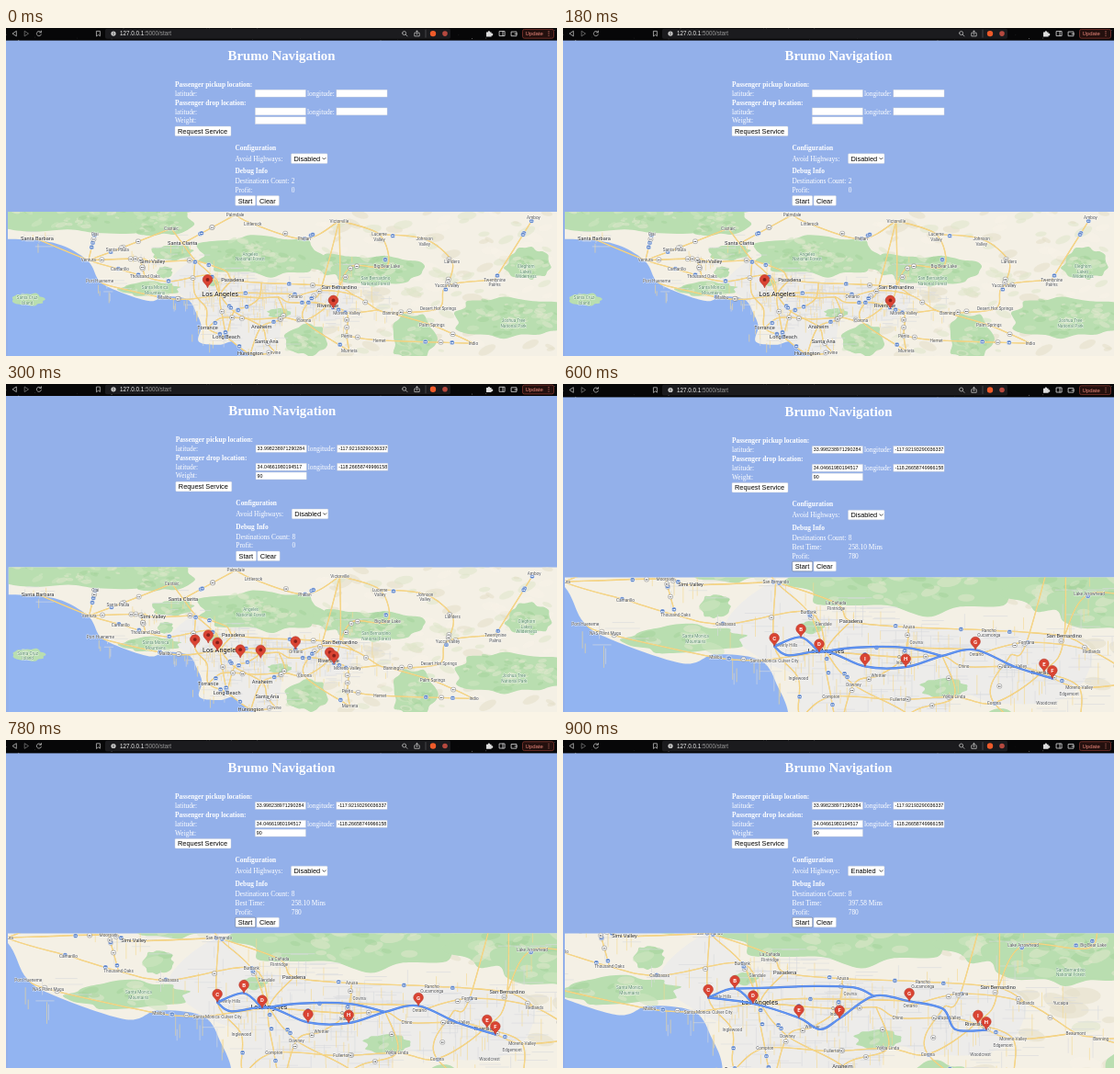
These frames come from a looping animation (600 by 357 pixels, 1200 ms). An HTML page:

```html
<!DOCTYPE html>
<html lang="en">
<head>
<meta charset="utf-8">
<title>Route planner</title>
<style>
html, body { margin: 0; width: 100%; height: 100%; overflow: hidden; background: #93b0ea; }
#stage { display: block; width: 100vw; height: 100vh; }
.scene { visibility: hidden; animation: show 1.2s step-end infinite; animation-delay: calc(var(--i) * .3s - 1.2s); }
@keyframes show { 0% { visibility: visible } 25%, 100% { visibility: hidden } }
.serif { font: 7.38px "Liberation Serif", Times, serif; fill: #fff; }
.bold { font-weight: bold; }
.title { font-size: 14.77px; text-anchor: middle; }
.ui { font: 7.38px "Liberation Sans", Arial, sans-serif; fill: #000; }
.value { font-size: 5.3px; }
.address { font-size: 6.3px; fill: #eee; }
.update { font-size: 6px; fill: #f08a7e; }
.place { font: 4.7px Roboto, Arial, sans-serif; fill: #4d4f52; text-anchor: middle;
  paint-order: stroke; stroke: #fff; stroke-opacity: .75; stroke-width: 1px; stroke-linejoin: round; }
.city { font-size: 5.7px; fill: #26282b; }
.metro { font-size: 7.3px; fill: #111; }
.park { fill: #4f8560; }
.letter { font: bold 6px Roboto, Arial, sans-serif; fill: #fff; text-anchor: middle; }
.line { fill: none; stroke-linecap: round; stroke-linejoin: round; }
</style>
</head>
<body>
<svg id="stage" viewBox="0 0 600 357" preserveAspectRatio="none"></svg>
<script>
// Geography: degrees west, degrees north.
const parse = s => Object.fromEntries(s.split(',').map(e => {
  const [, name, w, n] = e.trim().match(/^(.+) (\S+) (\S+)$/);
  return [name, [+w, +n]];
}));
const metro = parse('Los Angeles 118.24 34.05');
const cities = parse(`Santa Barbara 119.7 34.42, Santa Clarita 118.54 34.39, Simi Valley 118.78 34.27, Pasadena 118.14 34.15,
  San Bernardino 117.29 34.1, Riverside 117.38 33.98, Anaheim 117.91 33.84, Santa Ana 117.87 33.74, Long Beach 118.19 33.77,
  Torrance 118.34 33.83, Huntington 118 33.66`);
const towns = parse(`Ventura 119.29 34.28, Ojai 119.24 34.45, Santa Paula 119.06 34.35, Camarillo 119.04 34.22, Port Hueneme 119.2 34.14,
  Thousand Oaks 118.84 34.17, Malibu 118.68 34.03, Castaic 118.63 34.49, Palmdale 118.12 34.58, Littlerock 117.98 34.52,
  Phelan 117.57 34.42, Victorville 117.29 34.54, Lucerne/Valley 116.97 34.45, Johnson/Valley 116.61 34.42, Landers 116.39 34.27,
  Big Bear Lake 116.91 34.24, Yucca Valley 116.43 34.11, Twentynine/Palms 116.05 34.15, Amboy 115.74 34.56, Desert Hot Springs 116.5 33.96,
  Palm Springs 116.55 33.85, Indio 116.22 33.73, Banning 116.88 33.93, Hemet 116.97 33.75, Perris 117.23 33.78,
  Moreno Valley 117.23 33.93, Murrieta 117.21 33.68, Irvine 117.8 33.67, Corona 117.57 33.88, Ontario 117.64 34.04`);
const suburbs = parse(`Moorpark 118.88 34.29, NAS Point Mugu 119.12 34.11, San Fernando 118.44 34.28, Calabasas 118.64 34.14,
  Burbank 118.31 34.18, Glendale 118.25 34.14, La Cañada/Flintridge 118.2 34.21, Beverly Hills 118.4 34.07, Santa Monica 118.49 34.02,
  Culver City 118.39 34.02, Inglewood 118.35 33.96, Compton 118.22 33.9, Downey 118.13 33.94, Whittier 118.03 33.97,
  City of/Industry 117.93 34.03, Azusa 117.91 34.13, Covina 117.88 34.08, Fullerton 117.95 33.89, Yorba Linda 117.73 33.9,
  Chino 117.69 34, Rancho/Cucamonga 117.59 34.12, Fontana 117.44 34.08, Jurupa Valley 117.49 34, Redlands 117.18 34.05,
  Yucaipa 117.04 34.05, Beaumont 116.98 33.95, Lake Arrowhead 117.19 34.24, Edgemont 117.27 33.91, Woodcrest 117.36 33.88`);
const stops = parse(`Westwood 118.446 34.067, Hollywood 118.34 34.097, Downtown 118.267 34.047, Rivera 118.084 34,
  Rowland 117.922 33.998, Montclair 117.644 34.055, Canyon 117.37 33.982, Victoria 117.337 33.96`);
const junctions = parse(`Cheviot 118.39 34.037, Alhambra 118.117 34.063, West Covina 117.92 34.062, Pomona 117.776 34.035,
  Eagle Rock 118.2 34.1, San Gabriel 118.02 34.105, San Dimas 117.86 34.1, Claremont 117.787 34.072, La Habra 118 33.962,
  Mira Loma 117.51 34.03, Norco 117.46 33.962`);
const atlas = { ...metro, ...cities, ...towns, ...suburbs, ...stops, ...junctions };
const through = s => s.split('>').map(name => atlas[name]);

const highways = [
  'Santa Barbara>Ventura>Camarillo>Thousand Oaks>Calabasas>Burbank>Los Angeles',
  'Castaic>Santa Clarita>San Fernando>Burbank>Los Angeles>Downey>Anaheim>Santa Ana>Irvine',
  'Santa Monica>Los Angeles>Alhambra>West Covina>Montclair>Ontario>Fontana>Redlands>Beaumont>Banning>Palm Springs>Indio',
  'Victorville>Fontana>Mira Loma>Corona>Murrieta', 'Palmdale>Littlerock>Phelan>Victorville', 'Santa Clarita>Palmdale',
  'San Fernando>La Cañada/Flintridge>Pasadena>Azusa>Rancho/Cucamonga>San Bernardino>Redlands',
  'Los Angeles>City of/Industry>Pomona>Chino>Jurupa Valley>Riverside>Moreno Valley>Beaumont',
  'San Fernando>Westwood>Inglewood>Torrance>Long Beach>Huntington>Irvine',
  'Torrance>Compton>Fullerton>Yorba Linda>Corona>Riverside>San Bernardino>Victorville',
  'Azusa>City of/Industry>Whittier>Downey>Long Beach', 'Pomona>Yorba Linda>Anaheim>Huntington',
  'Ventura>Moorpark>Simi Valley>San Fernando', 'Ventura>Santa Paula>Castaic', 'Moorpark>Thousand Oaks', 'Ventura>Ojai',
  'Riverside>Moreno Valley>Perris>Murrieta', 'Banning>Desert Hot Springs>Yucca Valley>Twentynine/Palms',
  'San Bernardino>Lake Arrowhead>Big Bear Lake>Lucerne/Valley>Victorville', 'Lucerne/Valley>Johnson/Valley>Landers>Yucca Valley',
  'Perris>Hemet>Indio', 'Pasadena>Los Angeles>Compton>Long Beach', 'Port Hueneme>NAS Point Mugu>Malibu>Santa Monica',
  'Twentynine/Palms>Amboy'
].map(through);
const basin = through('San Fernando>Burbank>Pasadena>Azusa>Rancho/Cucamonga>San Bernardino>Redlands>Moreno Valley>Woodcrest>Corona>Yorba Linda>Irvine>Huntington>Long Beach>Torrance>Inglewood>Santa Monica>Calabasas');
const loop = 'Westwood>Hollywood>Downtown';
const routes = {
  direct: [loop, 'Westwood>Cheviot>Los Angeles>Rivera>Rowland>Pomona>Montclair>Jurupa Valley>Victoria', 'Downtown>Alhambra>West Covina>Pomona'],
  detour: [loop, 'Westwood>Downtown>Rivera>La Habra>Rowland>Claremont>Montclair>Mira Loma>Norco>Victoria',
    'Hollywood>Eagle Rock>San Gabriel>San Dimas>Claremont']
};
const coast = '120 34.42,119.69 34.41,119.48 34.37,119.29 34.27,119.21 34.15,119.1 34.09,118.81 34.01,118.68 34.04,118.5 34.02,118.43 33.93,118.39 33.84,118.41 33.74,118.25 33.72,118.1 33.74,117.93 33.61,117.7 33.46'
  .split(',').map(p => p.split(' ').map(Number));
// Parks: centre, then half width and height.
const parks = [
  [119.35, 34.61, .85, .15], [118.72, 34.56, .25, .12], [117.92, 34.31, .52, .13], [117.3, 34.25, .22, .07], [116.97, 34.21, .34, .1],
  [116.7, 33.76, .17, .16], [115.9, 33.9, .5, .13], [118.8, 34.09, .25, .045], [117.55, 33.75, .17, .1], [115.78, 34.26, .18, .1],
  [118.62, 34.33, .17, .05], [118.3, 34.13, .05, .02], [117.77, 33.93, .09, .03], [118.68, 34.2, .06, .04], [119.77, 34.02, .12, .04]
];
const parkNames = parse(`Angeles/National Forest 118 34.32, Santa Monica/Mountains 118.76 34.1, San Bernardino/National Forest 117 34.16,
  Joshua Tree/National Park 115.9 33.88, Cleghorn/Lakes/Wilderness 115.8 34.24, Santa Cruz/Island 119.78 34.03`);

const seeded = seed => () => (seed = (seed * 16807) % 2147483647) / 2147483647;
const many = (n, f) => Array.from({ length: n }, (_, i) => f(i)).join('');
const text = (x, y, cls, s) => `<text x="${x}" y="${y}" class="${cls}">${s}</text>`;
const rect = (x, y, w, h, attrs = 'fill="#fff"') => `<rect x="${x}" y="${y}" width="${w}" height="${h}" ${attrs}/>`;
const path = (d, fill) => `<path d="${d}" fill="${fill}"/>`;

// Smooth curve through points; closed when asked.
function curve(p, closed) {
  const n = p.length;
  const at = i => closed ? p[(i + n) % n] : p[Math.max(0, Math.min(n - 1, i))];
  let d = `M${p[0]}`;
  for (let i = 0; i < (closed ? n : n - 1); i++) {
    const [a, b, c, e] = [at(i - 1), at(i), at(i + 1), at(i + 2)];
    d += `C${b[0] + (c[0] - a[0]) / 6},${b[1] + (c[1] - a[1]) / 6} ${c[0] - (e[0] - b[0]) / 6},${c[1] - (e[1] - b[1]) / 6} ${c}`;
  }
  return d;
}
const line = (p, color, w) => `<path class="line" d="${curve(p)}" stroke="${color}" stroke-width="${w}"/>`;

// Flat map projection around downtown; x, y is where it lands on the stage.
const projection = (scale, x, y) => ([w, n]) => [x - scale * (w - 118.267), y + scale * 1.205 * (34.047 - n)];
const projections = { wide: projection(136.5, 229.5, 291), near: projection(273, 279, 292) };

function drawMap(id) {
  const project = projections[id], near = id === 'near', r = seeded(77);
  const zoom = near ? 2 : 1;
  const spread = n => (r() + r() - 1) * n;

  const patch = (w, n, size, color) => {
    const [x, y] = project([w, n]), s = size * (.4 + r());
    return `<ellipse cx="${x}" cy="${y}" rx="${s * 1.6}" ry="${s * .7}" fill="${color}" opacity=".55" transform="rotate(${r() * 60 - 30} ${x} ${y})"/>`;
  };
  const park = ([w, n, rw, rn]) => {
    const edge = Array.from({ length: 22 }, (_, i) => {
      const a = i / 22 * 2 * Math.PI, k = .85 + r() * .3;
      return project([w + rw * k * Math.cos(a), n + rn * k * Math.sin(a)]);
    });
    const tones = ['#a6d39d', '#cfe6c1', '#e0e8cd'];
    return path(curve(edge, true), '#b9deb0')
      + many(Math.min(70, rw * rn * 1200), i => patch(w + spread(rw * .9), n + spread(rn * .9), 3 * zoom, tones[i % 3]));
  };
  const desert = many(170, i => patch(115.6 + r() * 1.9, 33.55 + r() * 1.1, 5 * zoom, ['#e4dec8', '#f7f3e8', '#dfe6cb'][i % 3]));

  // Short streets crossing around every built-up place.
  const streets = Object.values({ ...metro, ...cities, ...suburbs, ...junctions }).map(p => many(9, i => {
    const [x, y] = project(p), a = x + spread(22 * zoom), b = y + spread(12 * zoom), l = (8 + r() * 12) * zoom;
    const d = i % 2 ? `h${l}` : `v${l * .6}`;
    return `<path d="M${a},${b}${d}" stroke="${i % 4 ? '#d9dadd' : '#f5d88f'}" stroke-width=".6"/>`;
  })).join('');

  const roads = highways.map(h => h.map(project));
  const shield = p => {
    const i = r() * (p.length - 1) | 0, t = r(), blue = r() < .55;
    const [x, y] = p[i].map((v, k) => v + (p[i + 1][k] - v) * t);
    return rect(x - 2.4, y - 2.3, 4.8, 4.6, `rx="1.6" fill="${blue ? '#5b83c9' : '#fff'}" stroke="${blue ? '#fff' : '#777'}" stroke-width=".5"`)
      + `<path d="M${x - 1.3},${y + .2}h2.6" stroke="${blue ? '#fff' : '#555'}" stroke-width="1.1" stroke-dasharray="1.1 .4"/>`;
  };
  const labels = (group, cls) => Object.entries(group).map(([name, p]) => {
    const [x, y] = project(p);
    return name.split('/').map((s, i) => text(x, y + 1.7 + i * 5.6, 'place ' + cls, s)).join('');
  }).join('');

  const shore = curve(coast.map(project));
  return `<g id="${id}">` + rect(-10, 150, 720, 250, 'fill="#92b4f1"')
    + path(shore + 'L900,600 900,-100 -300,-100Z', '#f4f0e5') + desert
    + path(curve(basin.map(project), true), '#edecea') + parks.map(park).join('') + streets
    + roads.map(p => line(p, '#eec568', 1.3) + line(p, '#fbe09a', .7)).join('')
    + roads.map(p => many(near ? 5 : 4, () => shield(p))).join('')
    + labels(towns, '') + (near ? labels(suburbs, '') : '') + labels(parkNames, 'park') + labels(cities, 'city') + labels(metro, 'metro')
    + '</g>';
}

function pin([x, y], letter) {
  return `<g transform="translate(${x} ${y - 8.5})"><path d="M0,8.5C-.8,4.5 -5.3,3.2 -5.3,-.4A5.3,5.3 0 1 1 5.3,-.4C5.3,3.2 .8,4.5 0,8.5Z" fill="#da4433" stroke="#b23427" stroke-width=".6"/>`
    + (letter ? text(0, 1.8, 'letter', letter) : '<circle r="1.9" cy="-.4" fill="#86201a"/>') + '</g>';
}

function toolbar(h) {
  const r = seeded(42);
  const icon = (d, color = '#bbb', w = .8) => `<path class="line" d="${d}" stroke="${color}" stroke-width="${w}"/>`;
  return rect(0, 0, 600, h, 'fill="#070708"')
    + many(60, () => `<circle cx="${r() * 600}" cy="${r() * h}" r="${.15 + r() * .35}" fill="#fff" opacity="${.3 + r() * .6}"/>`)
    + rect(108, .8, 376, h - 2.6, 'rx="2" fill="#1b1b1e"')
    + `<g transform="translate(0 ${h / 2 - .7})">`
    + icon('M11,-2.6L7,0 11,2.6Z') + icon('M20.5,-2.6L24.5,0 20.5,2.6Z', '#777')
    + icon('M38,-1.6A2.6,2.6 0 1 0 38.4,.9M38.4,-3v1.8h-1.8') + icon('M98.8,-2.7h3.6v5.4l-1.8,-1.4 -1.8,1.4z')
    + '<circle cx="117" r="2.6" fill="#ccc"/>' + icon('M117,-.2v1.3M117,-1.3v.1', '#222', .7)
    + text(124, 2.2, 'ui address', '127.0.0.1<tspan fill="#999">:5000/start</tspan>')
    + icon('M431.6,-.5a2,2 0 1 0 4,0a2,2 0 1 0 -4,0M435.2,1l1.8,1.8') + icon('M446,-.6h-1.2v3.4h5.4v-3.4h-1.2M447.5,1v-4M446,-1.7l1.5,-1.5 1.5,1.5')
    + icon('M457,-4v8', '#666', .6)
    + '<circle cx="465" r="3.2" fill="#ef5b2a"/><circle cx="478" r="2.8" fill="#b5493f"/>'
    + path('M523,-1.7h1.7a1.2,1.2 0 1 1 2.4,0h1.5v1.6a1.2,1.2 0 1 1 0,2.2v1.2h-5.6z', '#ddd')
    + icon('M537.5,-2.5h5.6v5h-5.6zM541,-2.5v5', '#ddd') + icon('M550.5,-2h5.5v4.6h-5.5zM554,.3h2.5', '#ddd')
    + rect(562.5, -4.7, 34, 9.8, 'rx="2" fill="#24100e" stroke="#8e3a31" stroke-width=".7"')
    + text(565.5, 2.1, 'ui update', 'Update') + icon('M591,-2.2v0M591,0v0M591,2.2v0', '#f08a7e', 1.1) + '</g>';
}

function button(x, y, w, label, border = '#c4c9d4') {
  return rect(x, y, w, 10.6, `rx="1" fill="#fff" stroke="${border}" stroke-width=".4"`) + text(x + 3, y + 8, 'ui', label);
}

function form({ values = [], highways = 'Disabled', count, best, profit }) {
  const shift = best ? 10.2 : 0;
  const field = (x, y, v = '') => rect(x, y, 55.3, 8, 'fill="#fff" stroke="#b6bfd2" stroke-width=".4"') + text(x + 1.6, y + 5.9, 'ui value', v);
  const info = (y, label, v) => text(249.5, y, 'serif', label) + text(310.7, y, 'serif', v);
  const pair = (y, a, b) => text(184, y, 'serif', 'latitude:') + field(271.2, y - 6.6, a) + text(328, y, 'serif', 'longitude:') + field(359.8, y - 6.6, b);
  return text(300, 35, 'serif bold title', 'Brumo Navigation')
    + text(184, 64, 'serif bold', 'Passenger pickup location:') + pair(73.7, values[0], values[1])
    + text(184, 83.7, 'serif bold', 'Passenger drop location:') + pair(93.5, values[2], values[3])
    + text(184, 103.2, 'serif', 'Weight:') + field(271.2, 96.7, values[4])
    + button(184, 107, 61, 'Request Service')
    + text(249.5, 132.5, 'serif bold', 'Configuration') + text(249.5, 144.7, 'serif', 'Avoid Highways:')
    + button(310.5, 136.8, 39.5, highways) + '<path class="line" d="M344.8,141.4l1.6,1.6 1.6,-1.6" stroke="#222" stroke-width=".8"/>'
    + text(249.5, 158.3, 'serif bold', 'Debug Info') + info(169.4, 'Destinations Count:', count)
    + (best ? info(179.4, 'Best Time:', best) : '') + info(179.2 + shift, 'Profit:', profit)
    + button(249.7, 182.6 + shift, 22, 'Start', best && '#39445c') + button(273, 182.6 + shift, 24.4, 'Clear');
}

const values = ['33.998238971290284', '-117.92193290036337', '34.04661980194517', '-118.26658749966158', '90'];
const every = Object.keys(stops);
const solved = { bar: 14.4, dx: 0, dy: .4, values, count: 8, profit: 780, map: 'near', top: 210.4, pins: every };
const scenes = [
  { bar: 13.6, dx: 0, dy: 0, count: 2, profit: 0, map: 'wide', top: 200, move: [0, 0], pins: ['Hollywood', 'Victoria'] },
  { bar: 13, dx: .8, dy: -.7, values, count: 8, profit: 0, map: 'wide', top: 199.4, move: [.7, -.7], pins: every },
  { ...solved, best: '258.10 Mins', move: [0, 0], path: 'direct', letters: 'CBDIHGEF' },
  { ...solved, highways: 'Enabled', best: '397.58 Mins', move: [-72, -5], path: 'detour', letters: 'CBDEFGIH' }
];

function scene(s, i) {
  const left = 2 + s.dx, w = 600 - left, h = 357 - s.top, project = projections[s.map];
  const track = (routes[s.path] || []).map(through).map(p => p.map(project));
  return `<g class="scene" style="--i:${i}">` + rect(0, 0, 600, 357, 'fill="#93b0ea"') + toolbar(s.bar)
    + `<g transform="translate(${s.dx} ${s.dy})">${form(s)}</g>`
    + `<svg x="${left}" y="${s.top}" width="${w}" height="${h}" viewBox="${left} ${s.top} ${w} ${h}">`
    + `<g transform="translate(${s.move})"><use href="#${s.map}"/>`
    + track.map(p => line(p, '#4a7cdf', 2.3) + line(p, '#6396f3', 1.4)).join('')
    + s.pins.map((name, k) => pin(project(stops[name]), s.letters && s.letters[k])).join('') + '</g></svg></g>';
}

document.getElementById('stage').innerHTML =
  '<defs>' + Object.keys(projections).map(drawMap).join('') + '</defs>' + scenes.map(scene).join('');
</script>
</body>
</html>
```
